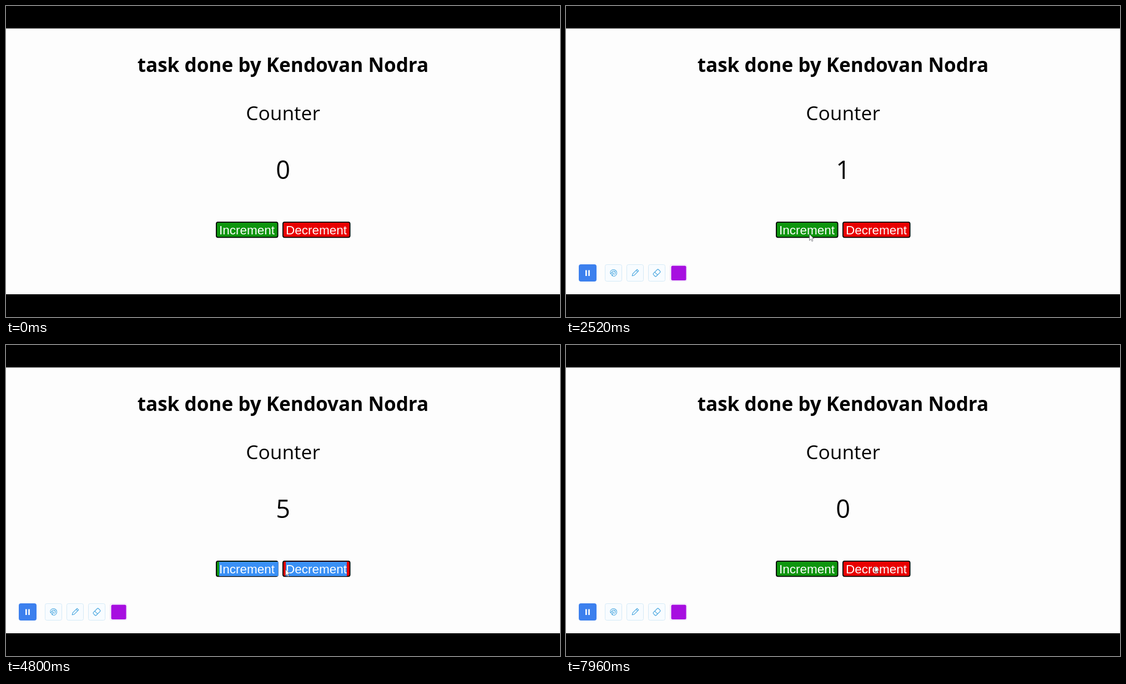
Write an HTML page with a canvas that moves like this. It is 998x561 px and loops after 8 s.

```html
<!DOCTYPE html>
<html lang="en">
<head>
<meta charset="utf-8">
<title>Counter</title>
<style>
  html, body { margin: 0; width: 100%; height: 100%; overflow: hidden; background: #000; }
  canvas { display: block; width: 998px; height: 561px; }
</style>
</head>
<body>
<canvas id="stage" width="998" height="561"></canvas>
<script>
const ctx = document.getElementById('stage').getContext('2d');
const LOOP = 8000, STEP = 40;
const SANS = '"Open Sans", "Noto Sans", sans-serif';
const ARIAL = '"Liberation Sans", Arial, sans-serif';
const BLUE = '#3a90f5', ICON = '#45a5df';

// Click times in ms and the span in which the labels are selected
const ups = [2280, 2840, 3320, 3800, 4280];
const downs = [5680, 6200, 6720, 7240, 7720];
const selection = { from: 3320, to: 7240 };

// Pointer path: time, x, y of the tip
const path = [
  [240, 880, 432], [600, 714, 391], [1040, 714, 391], [1760, 438, 411],
  [4480, 438, 411], [5080, 556, 398.5]
];

const clamp = v => Math.max(0, Math.min(1, v));
const ease = p => p * p * (3 - 2 * p);
const passed = (times, t) => times.filter(at => at <= t).length;

function text(str, x, y, font, color, align = 'center') {
  ctx.font = font;
  ctx.fillStyle = color;
  ctx.textAlign = align;
  ctx.fillText(str, x, y);
}

function box(x, y, w, h, r, fill, stroke, line = 1) {
  ctx.beginPath();
  ctx.roundRect(x, y, w, h, r);
  if (fill) { ctx.fillStyle = fill; ctx.fill(); }
  if (stroke) { ctx.strokeStyle = stroke; ctx.lineWidth = line; ctx.stroke(); }
}

function button(label, x, w, fill, selected, selectedWidth) {
  box(x + 0.9, 389.9, w - 1.8, 27.4, 3, fill, '#000', 1.8);
  if (selected) {
    ctx.fillStyle = BLUE;
    ctx.fillRect(x + 6, 391, selectedWidth, 26);
  }
  text(label, x + 6, 411.5, '22.5px ' + ARIAL, '#fff', 'left');
}

function icon(x, draw) {
  box(x + 0.5, 466.5, 30, 30, 3, '#f8fcff', '#d5eaf7');
  ctx.save();
  ctx.translate(x + 15.5, 481.5);
  ctx.strokeStyle = ICON;
  ctx.lineWidth = 1.1;
  ctx.lineJoin = 'round';
  draw();
  ctx.restore();
}

function spiral() {
  ctx.beginPath();
  ctx.arc(0, 0, 6, -2.9, 1.7);
  ctx.stroke();
  ctx.beginPath();
  ctx.arc(0, 0, 3.2, -2.9, 1.2);
  ctx.stroke();
  ctx.beginPath();
  ctx.moveTo(-6, 0); ctx.lineTo(0, 0); ctx.lineTo(-2, 5.5); ctx.lineTo(-3.5, 2.8);
  ctx.closePath();
  ctx.stroke();
}

function pencil() {
  ctx.rotate(Math.PI / 4);
  ctx.beginPath();
  ctx.moveTo(-1.9, -7); ctx.lineTo(1.9, -7); ctx.lineTo(1.9, 4);
  ctx.lineTo(0, 7.5); ctx.lineTo(-1.9, 4);
  ctx.closePath();
  ctx.moveTo(-1.9, -4.5); ctx.lineTo(1.9, -4.5);
  ctx.stroke();
}

function eraser() {
  ctx.rotate(-Math.PI / 4);
  box(-6.5, -3.6, 13, 7.2, 1.6, null, ICON, 1.1);
  ctx.beginPath();
  ctx.moveTo(-1.5, -3.6); ctx.lineTo(-1.5, 3.6);
  ctx.stroke();
}

function toolbar(alpha) {
  ctx.globalAlpha = alpha;
  box(23, 466, 32, 31, 4, '#3c80ee');
  ctx.fillStyle = '#fff';
  ctx.fillRect(35, 476.5, 2.6, 10.5);
  ctx.fillRect(40.2, 476.5, 2.6, 10.5);
  icon(70, spiral);
  icon(109, pencil);
  icon(148, eraser);
  box(187.5, 466.5, 30, 30, 3, '#fbfaff', '#ebe6f7');
  box(189.5, 468.5, 27, 26.5, 2.5, '#a70fe0');
  ctx.globalAlpha = 1;
}

function pointer(t) {
  if (t < path[0][0]) return;
  let [, x, y] = path[0];
  for (let i = 1; i < path.length; i++) {
    const [t0, x0, y0] = path[i - 1], [t1, x1, y1] = path[i];
    if (t < t0) break;
    const p = ease(clamp((t - t0) / (t1 - t0)));
    x = x0 + (x1 - x0) * p;
    y = y0 + (y1 - y0) * p;
  }
  ctx.save();
  ctx.translate(x + 0.5, y + 0.5);
  ctx.beginPath();
  ctx.moveTo(0, 0); ctx.lineTo(0, 11.5); ctx.lineTo(2.7, 9); ctx.lineTo(4.5, 13);
  ctx.lineTo(6.3, 12.2); ctx.lineTo(4.6, 8.3); ctx.lineTo(8, 8.1);
  ctx.closePath();
  ctx.fillStyle = '#fff';
  ctx.fill();
  ctx.strokeStyle = 'rgba(50, 50, 60, 0.65)';
  ctx.lineWidth = 0.9;
  ctx.stroke();
  ctx.restore();
}

function draw(t) {
  ctx.fillStyle = '#000';
  ctx.fillRect(0, 0, 998, 561);
  ctx.fillStyle = '#fdfdfd';
  ctx.fillRect(0, 40.5, 998, 479.5);

  text('task done by Kendovan Nodra', 499, 118.5, 'bold 35.1px ' + SANS, '#000');
  text('Counter', 499, 206, '35.3px ' + SANS, '#000');
  text(passed(ups, t) - passed(downs, t), 499, 312, '45px ' + SANS, '#000');

  const selected = t >= selection.from && t < selection.to;
  button('Increment', 378, 112.5, '#0e950e', selected, 106.5);
  button('Decrement', 498, 122.5, '#e90000', selected, 110);

  toolbar(clamp((t - 80) / 320));
  pointer(t);
}

const start = performance.now();
function tick() {
  const t = (performance.now() - start) % LOOP;
  draw(Math.floor(t / STEP) * STEP);
  requestAnimationFrame(tick);
}
tick();
</script>
</body>
</html>
```
